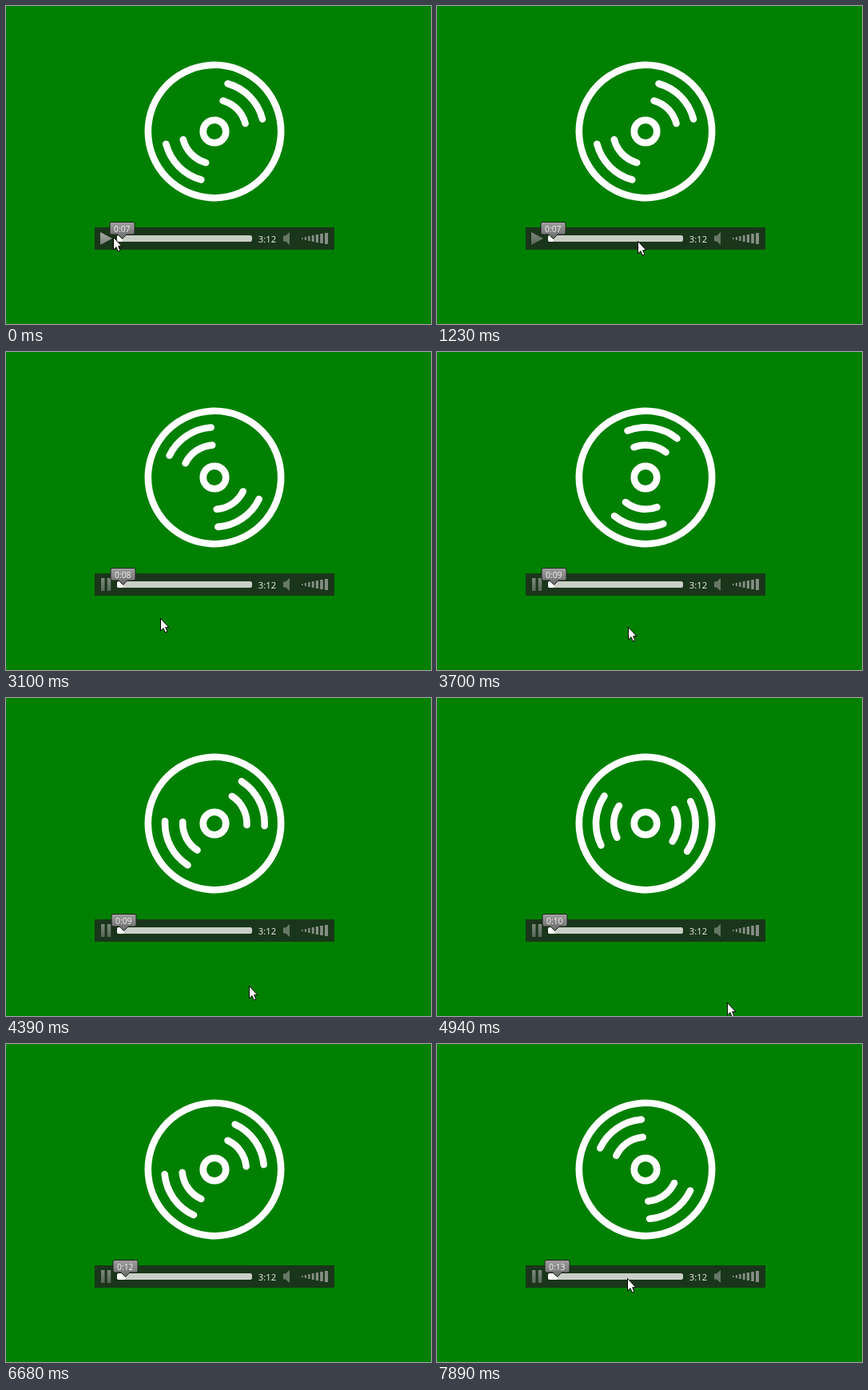
Animation, 532 px wide and 398 px high, one loop 8 s. Source, as an HTML page:

```html
<!DOCTYPE html>
<html lang="en">
<head>
<meta charset="utf-8">
<title>Audio player</title>
<style>
  html, body { margin: 0; width: 100%; height: 100%; overflow: hidden; background: #008000; }
  svg { display: block; width: 532px; height: 398px; }
  text { font-family: "Open Sans", "Noto Sans", sans-serif; }
</style>
</head>
<body>
<svg viewBox="0 0 532 398">
  <defs>
    <linearGradient id="tipFill" x2="0" y2="1">
      <stop stop-color="#a0a0a0"/><stop offset="1" stop-color="#686868"/>
    </linearGradient>
    <linearGradient id="iconFill" x2="0" y2="1">
      <stop stop-color="#c0c4c0"/><stop offset="1" stop-color="#878c87"/>
    </linearGradient>
  </defs>

  <g transform="translate(261 157)" fill="none" stroke="#fff" stroke-width="8.6" stroke-linecap="round">
    <circle r="83.2"/>
    <circle r="14.3"/>
    <path id="waves"/>
  </g>

  <rect x="111" y="277" width="300" height="28" fill="#1a361a"/>
  <g id="button" fill="url(#iconFill)">
    <path id="play" d="M118 283L133 291L118 299Z"/>
    <path id="pause" d="M119 283h4.5v16h-4.5zM126.7 283h4.5v16h-4.5z"/>
  </g>
  <rect x="139" y="287" width="169" height="8" rx="2.5" fill="#c9cfc6"/>
  <rect id="played" x="139" y="287" height="8" rx="2.5" fill="#fff"/>
  <text x="315.8" y="296" font-size="11.3" fill="#eef0ee">3:12</text>
  <path d="M347 287.5h3l5 -4.5v16l-5 -4.5h-3z" fill="#667866"/>
  <g id="volume" fill="#858f85"></g>

  <g id="tip">
    <path d="M2 .5H29Q31 .5 31 2.5V14Q31 16 29 16H21L15.5 21.5L10 16H2Q0 16 0 14V2.5Q0 .5 2 .5Z"
      transform="translate(0 270)" fill="url(#tipFill)" stroke="#1c241c"/>
    <text id="clock" x="15.3" y="282.7" font-size="10.3" fill="#f4f4f4" text-anchor="middle"></text>
  </g>
  <path id="cursor" d="M.5 .5V16L4 12.7L6.3 18.1L9 17L6.7 11.7H11Z" fill="#fff" stroke="#000"/>
</svg>

<script>
const $ = id => document.getElementById(id);
const LOOP = 8000, START = 1735;

// The screen refreshes in even steps of roughly 137 ms between these times
const beats = [0, 2140, 3100, 4390, 5630, 6680, 7890, LOOP];

// Pointer stops: [time, x, y], eased in between
const stops = [[0, 134, 289], [900, 336, 296], [1600, 124, 292], [2140, 139, 320], [3100, 193, 333],
  [4390, 304, 360], [5210, 420, 402], [6500, 320, 410], [7890, 238, 293], [LOOP, 238, 293]];

function refreshTime(t) {
  const i = beats.findIndex(beat => beat > t);
  const from = beats[i - 1], span = beats[i] - from;
  const step = span / Math.round(span / 137);
  return from + Math.floor((t - from) / step) * step;
}

function pointerAt(t) {
  const i = stops.findIndex(stop => stop[0] > t);
  const [t0, x0, y0] = stops[i - 1], [t1, x1, y1] = stops[i];
  const k = (t - t0) / (t1 - t0);
  const ease = k * k * (3 - 2 * k);
  return [Math.round(x0 + (x1 - x0) * ease), Math.round(y0 + (y1 - y0) * ease)];
}

function draw(t) {
  const playing = t >= START;
  const elapsed = Math.max(0, t - 1760);
  const [x, y] = pointerAt(t);
  const hover = x >= 111 && x < 139 && y >= 277 && y < 305;
  const tipX = 131 + Math.max(-1, Math.floor((t - 2740) / 1112));
  const seconds = Math.floor(7.25 + elapsed / 1000);

  $("waves").setAttribute("transform", `rotate(${-44.5 + elapsed * 0.075})`);
  $("play").style.display = playing ? "none" : "";
  $("pause").style.display = playing ? "" : "none";
  $("button").setAttribute("opacity", hover ? 0.85 : 0.58);
  $("tip").setAttribute("transform", `translate(${tipX} 0)`);
  $("played").setAttribute("width", tipX - 123);
  $("clock").textContent = "0:" + String(seconds).padStart(2, "0");
  $("cursor").setAttribute("transform", `translate(${x} ${y})`);
}

// A 60° arc on the right, or on the left for a negative radius
const arc = r => `M${r * 0.866} ${-r / 2}A${Math.abs(r)} ${Math.abs(r)} 0 0 1 ${r * 0.866} ${r / 2}`;
$("waves").setAttribute("d", [62, 39.8, -62.7, -40.5].map(arc).join(""));

for (let i = 0; i < 7; i++) {
  const bar = document.createElementNS("http://www.w3.org/2000/svg", "rect");
  const height = 2 + 2 * i;
  const box = { x: 370 + 3.7 * i + 0.19 * i * i, y: 291 - height / 2, width: 1.6 + 0.4 * i, height };
  for (const name in box) bar.setAttribute(name, box[name]);
  $("volume").append(bar);
}

function tick() {
  draw(refreshTime(performance.now() % LOOP));
  requestAnimationFrame(tick);
}
tick();
</script>
</body>
</html>
```
